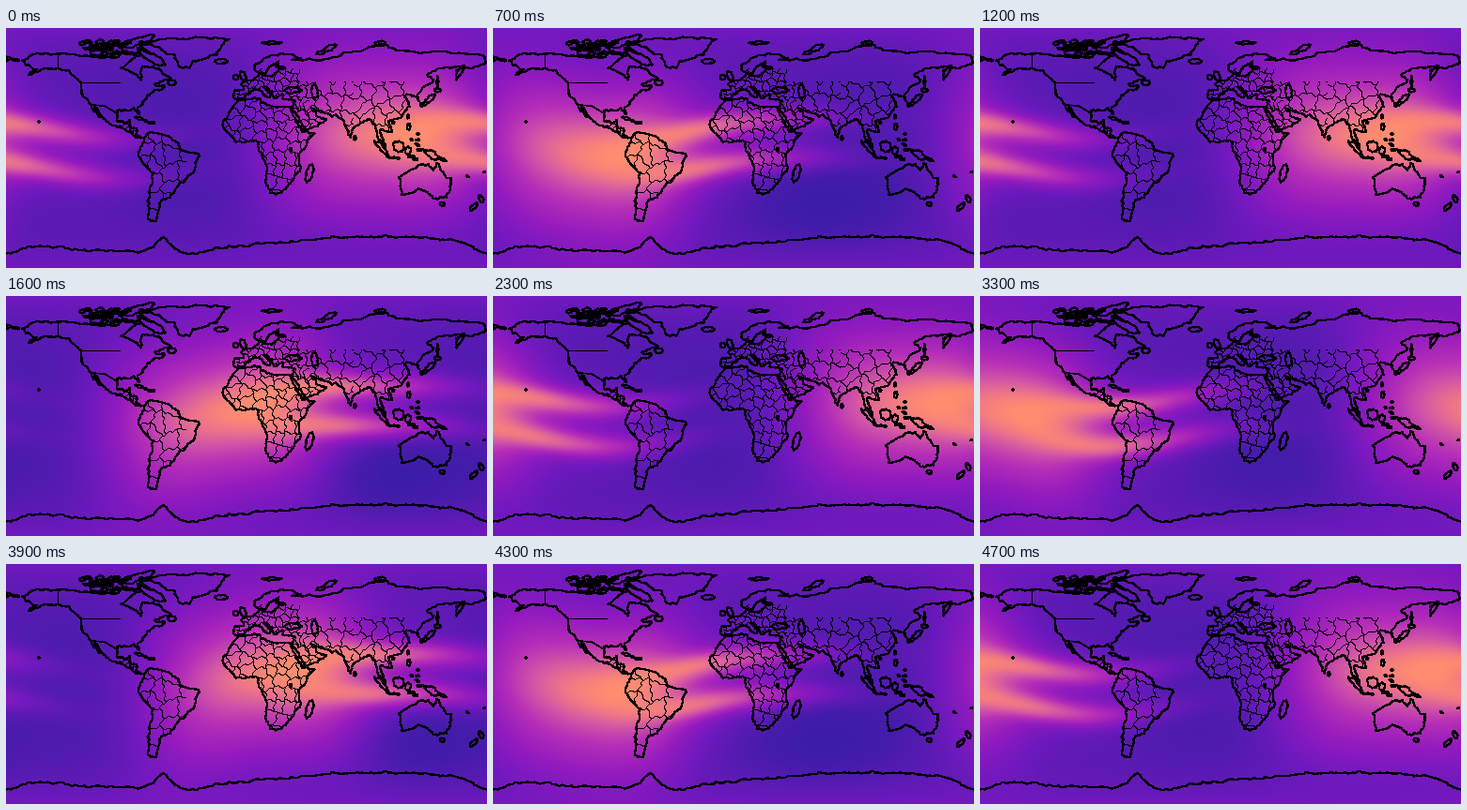
Animation of 512x256 px, one loop 4800 ms. Source, as a matplotlib script:

```python
import numpy as np
import matplotlib.pyplot as plt
from matplotlib.animation import FuncAnimation
from matplotlib.collections import LineCollection
from matplotlib.colors import LinearSegmentedColormap
from matplotlib.path import Path

W, H, DPI = 512, 256, 100
FRAMES, PER_DAY = 48, 12
rng = np.random.default_rng(4)

RAMP = [(0, "#321fa4"), (.15, "#461cab"), (.35, "#7319be"), (.5, "#941bbe"),
        (.65, "#b42eb8"), (.8, "#d258a5"), (.9, "#eb728c"), (1, "#ff8c70")]
CMAP = LinearSegmentedColormap.from_list("tec", RAMP, N=512)

X, Y = np.meshgrid(np.arange(W) + .5, np.arange(H) + .5)
LON, LAT = X * 360 / W - 180, 90 - Y * 180 / H


def bell(v, mid, s):
    return np.exp(-.5 * ((v - mid) / s) ** 2)


def wrap(x, mid):
    return (x - mid + W / 2) % W - W / 2


def lobe(x, mid, left, right, power=2):
    """Bell around the globe with its own width on each side."""
    d = wrap(x, mid)
    return np.exp(-.5 * np.abs(d / np.where(d < 0, left, right)) ** power)


# --- Map: key points roughened into coastlines ---

def rough(pts, depth=3):
    for _ in range(depth):
        d = np.diff(pts, axis=0)
        size = np.hypot(*d.T)[:, None] + 1e-9
        d *= np.minimum(1, 4 / size)
        mid = (pts[:-1] + pts[1:]) / 2
        mid += d[:, ::-1] * [1, -1] * rng.normal(0, .14, size.shape)
        out = np.empty((2 * len(pts) - 1, 2))
        out[::2], out[1::2] = pts, mid
        pts = out
    return pts


def shore(*c):
    pts = np.reshape(c, (-1, 2)).astype(float)
    return rough(np.vstack([pts, pts[:1]]))


def islet(lon, lat, w, h, tilt=0):
    a, t = np.linspace(0, 2 * np.pi, 9), np.radians(tilt)
    u, v = w / 2 * np.cos(a), h / 2 * np.sin(a)
    return rough(np.column_stack([lon + u * np.cos(t) - v * np.sin(t),
                                  lat + u * np.sin(t) + v * np.cos(t)]), 2)


def scatter(n, west, east, south, north, size):
    return [islet(rng.uniform(west, east), rng.uniform(south, north),
                  *(size * rng.uniform(.3, 1, 2) * (1.4, .6)),
                  rng.uniform(-30, 30)) for _ in range(n)]


north_america = shore(
    -168, 66, -157, 71, -128, 70, -96, 68, -94, 72, -82, 69, -94, 60, -82, 55,
    -79, 51, -78, 61, -70, 61, -65, 59, -56, 52, -69, 48, -61, 46, -70, 42,
    -76, 36, -81, 31, -80, 25, -84, 30, -97, 28, -97, 21, -91, 18.5, -87, 21,
    -88, 16, -83, 15, -83, 9.5, -77, 8, -83, 8, -95, 16, -105, 20, -114, 31,
    -110, 23, -117, 33, -124, 41, -124, 49, -135, 58, -150, 60, -163, 55,
    -157, 59, -165, 62)
south_america = shore(
    -77, 8, -72, 12, -62, 10, -51, 4, -50, 0, -35, -6, -39, -17, -48, -26,
    -57, -36, -65, -41, -66, -48, -68, -55, -74, -52, -73, -38, -70, -19,
    -81, -6, -77, 4)
africa = shore(
    32, 31, 20, 31, 11, 34, 10, 37, -6, 36, -17, 21, -17, 14, -8, 4.5, 5, 5,
    9, 4, 9, -1, 14, -11, 15, -27, 18, -34, 26, -34, 35, -24, 41, -15, 39, -5,
    51, 11, 43, 12, 37, 21)
eurasia = shore(
    34, 31, 36, 36, 27, 37, 27, 41, 22, 37, 19, 42, 13, 45.5, 18, 40, 16, 38,
    9, 44, 3, 42, -2, 37, -9, 37, -9, 43, -2, 44, -4, 48, 9, 54, 9, 57, 13, 54,
    21, 55, 24, 59, 29, 60, 22, 61, 24, 65, 17, 61, 14, 55.5, 6, 59, 6, 62,
    15, 68, 26, 71, 41, 67, 34, 66, 44, 66, 68, 68, 73, 72, 105, 77.5, 113, 73,
    140, 72.5, 178, 69,
    178, 63, 163, 60, 157, 51, 157, 58, 163, 62, 142, 59, 135, 55, 140, 51,
    128, 40, 129, 35, 122, 40, 118, 39, 122, 31, 116, 23, 106, 20, 109, 12,
    100, 13, 104, 1, 98, 9, 97, 17, 91, 22, 80, 15, 78, 8, 73, 20, 67, 25,
    56, 27, 48, 30, 52, 24, 60, 22, 52, 16, 43, 13, 35, 28)
australia = shore(
    114, -22, 131, -12, 136, -12, 140, -17, 142, -11, 153, -26, 150, -37,
    140, -38, 136, -34, 131, -31.5, 116, -35)
greenland = shore(-73, 78, -54, 70, -50, 61, -43, 60, -40, 65, -22, 70,
                  -19, 76, -13, 81.5, -35, 83, -60, 82)
chukotka = shore(-180, 65, -170, 66, -180, 69)
new_guinea = shore(131, -1, 141, -3, 150, -10, 143, -8, 138, -8)

ISLES = [(-71, 68, 24, 6, -30), (-110, 71, 14, 4), (-80, 80, 24, 6, 20),
         (-56, 49, 6, 4), (-79, 21.7, 10, 1.5, -20), (-71, 19, 5, 1.5),
         (-19, 65, 10, 3), (-2.5, 54, 4, 8, 25), (-8, 53, 4, 3.5),
         (19, 79, 15, 2), (60, 74, 17, 3, 25), (100, 79, 9, 2), (35, 43.3, 13, 4),
         (51, 42, 5, 11), (33, -1, 2, 2), (47, -19, 5, 14, -17),
         (81, 7.5, 2, 3), (143, 50, 1.5, 8), (143, 43.3, 5, 3),
         (136.5, 36, 13, 3, 43), (131, 32.5, 2, 3), (121, 23.7, 1.5, 3),
         (109.7, 19, 2, 1.5), (101, 0, 15, 3, -45), (110, -7.2, 10, 1.3, -8),
         (114, 1, 8, 9, 35), (121, -2, 4, 6), (121.5, 16, 2.5, 5),
         (146.5, -42, 4, 3), (175.5, -38, 3, 6, 20), (170, -44, 3, 8, -45),
         (-155.5, 19.7, 1, .7), (165.5, -21.2, 3, .7, -35), (178, -18, 1, .7)]

lon = np.linspace(-180, 180, 50)
antarctica = rough(np.column_stack([
    lon, -72 + 5.5 * np.sin(np.radians(lon - 10)) + 11 * bell(lon, -62, 5)
    - 2.5 * bell(lon, -40, 12) - 8 * bell(abs(lon), 180, 10)]), 2)

lands = [north_america, south_america, africa, eurasia]
coasts = lands + [australia, greenland, chukotka, new_guinea, antarctica]
coasts += [islet(*i) for i in ISLES]
coasts += scatter(42, -124, -74, 70, 80, 5)
coasts += scatter(9, 118, 130, -9, 12, 3)

# --- Borders: cells around jittered sites, one zone at a time ---

cells = np.column_stack([LON.ravel(), LAT.ravel()])
land = np.any([Path(p).contains_points(cells) for p in lands], axis=0).reshape(H, W)
border = np.zeros((H, W), bool)
ZONES = [(-17, 50, -34, 36, 8.5), (-8, 40, 37, 60, 5.5), (38, 80, 14, 50, 10),
         (80, 122, 10, 50, 11), (-80, -45, -50, 11, 12), (-95, -80, 8, 18, 4)]

for west, east, south, north, step in ZONES:
    sites = np.stack(np.meshgrid(np.arange(west, east + step, step),
                                 np.arange(south, north + step, step)), -1).reshape(-1, 2)
    sites = sites + rng.uniform(-.4, .4, sites.shape) * step
    u, v = LON + .7 * np.sin(LAT), LAT + .7 * np.sin(LON)
    near = np.argmin([np.hypot(u - a, v - b) for a, b in sites], axis=0)
    edge = (near != np.roll(near, 1, 0)) | (near != np.roll(near, 1, 1))
    zone = (LON > west) & (LON < east) & (LAT > south) & (LAT < north)
    border |= edge & zone & land

straight = [[(-123, 49), (-95, 49)], [(-141, 70), (-141, 60)],
            [(-117, 32.5), (-106, 31.5), (-97, 26)]]


# --- Field: a daytime bulge with two crests trailing along the dip equator ---

turn = 2 * np.pi * (X - 130) / W
M = Y - (125 + 11 * np.cos(turn) + 3 * np.cos(2 * turn))

BASE = .17 + .17 * np.abs(Y / 128 - 1) ** 3
BROAD = .46 * np.exp(-np.abs(M / 98) ** 3.5)
CORE = .35 * bell(M, -2, 28)
TRAIL = .2 * bell(M, 0, 45)
CRESTS = .42 * (bell(M, -21, 10) + bell(M, 22, 10))
SINK = .18 * lobe(X, 390, 80, 80) * bell(Y, 188, 30)


def field(n):
    d = X - 430 + W * (n % PER_DAY) / PER_DAY
    return np.clip(BASE + BROAD * lobe(d, -25, 112, 86, 3.5)
                   + CORE * lobe(d, -5, 75, 60)
                   + TRAIL * lobe(d, 110, 55, 70)
                   + CRESTS * lobe(d, 110, 45, 85)
                   - SINK * lobe(d, 170, 55, 80), 0, 1)


fig = plt.figure(figsize=(W / DPI, H / DPI), dpi=DPI)
ax = fig.add_axes([0, 0, 1, 1])
ax.axis("off")
flat = dict(extent=(-180, 180, -90, 90), aspect="auto", interpolation="nearest")
img = ax.imshow(field(0), cmap=CMAP, vmin=0, vmax=1, **flat)
ink = np.zeros((H, W, 4))
ink[..., 3] = border
ax.imshow(ink, **flat)
for lines, px in ((straight, .7), (coasts, 1.2)):
    ax.add_collection(LineCollection(lines, colors="black", antialiaseds=False,
                                     linewidths=px * 72 / DPI))
ax.set_xlim(-180, 180)
ax.set_ylim(-90, 90)


def update(n):
    img.set_data(field(n))
    return [img]


anim = FuncAnimation(fig, update, frames=FRAMES, interval=1200 // PER_DAY,
                     repeat=True, repeat_delay=0, blit=False)
plt.show()
```
